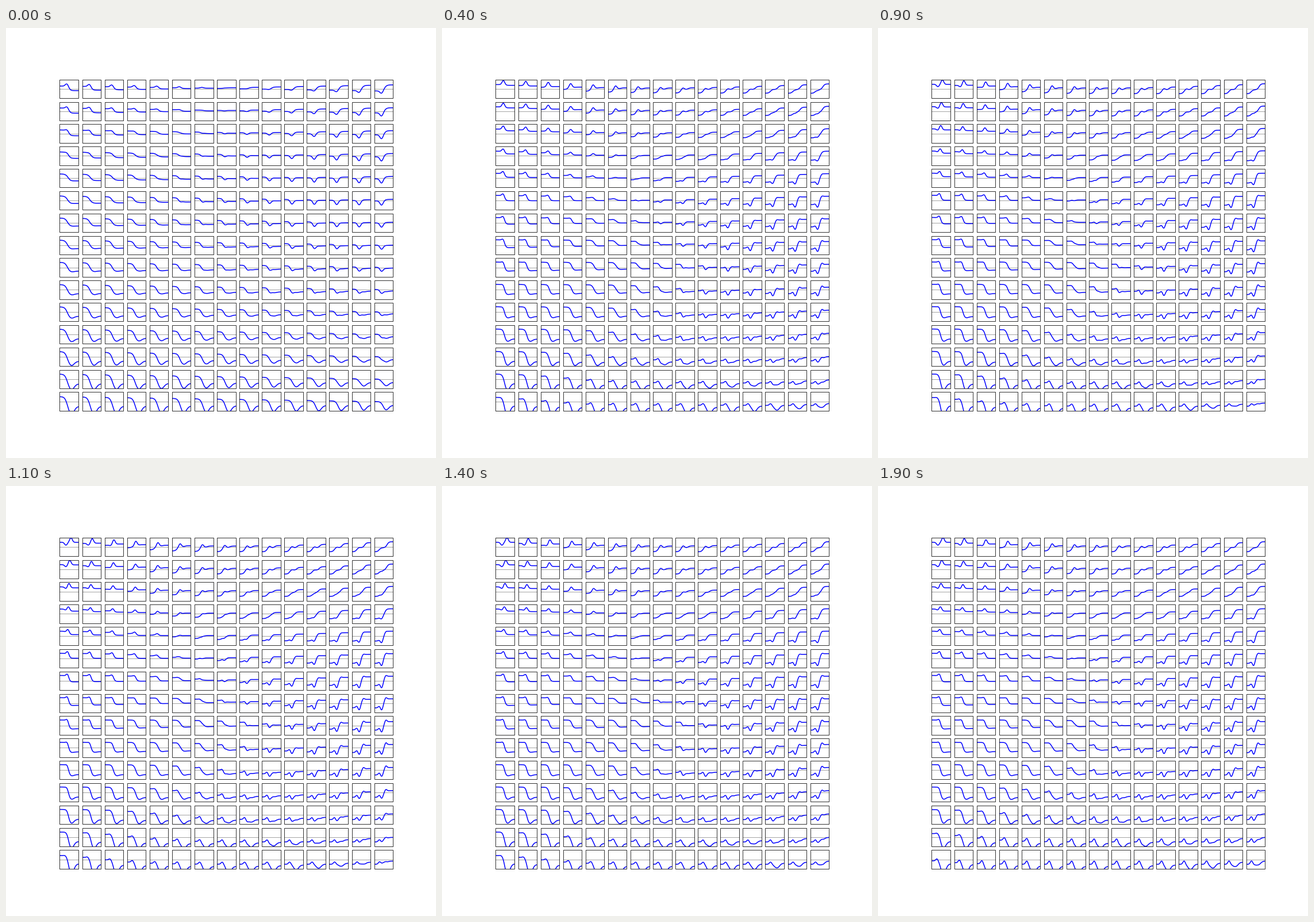
Recreate the animation shown at these times as a matplotlib script. Size 748 px wide and 748 px high, loop 2000 ms.

```python
import numpy as np
import matplotlib.pyplot as plt
from matplotlib.animation import FuncAnimation
from matplotlib.patches import Rectangle
from matplotlib.transforms import Bbox

SIZE, DPI, N, FRAMES = 748, 72, 15, 20

# row, column and position along the curve, shaped to broadcast
r = np.arange(N)[:, None, None]
c = np.arange(N)[None, :, None]
u = np.linspace(0, 1, 49)[None, None, :]
q, p = r / (N - 1), c / (N - 1)
corner = np.exp(-(r + c) / 2.5)


def ease(x):
    x = np.clip(x, 0, 1)
    return x * x * (3 - 2 * x)


def step(at, width):
    return 1 / (1 + np.exp((at - u) / width))


def bump(at, width):
    return np.exp(-((u - at) / width) ** 2)


def untrained():
    """Smooth map: curves fall on the left and dip on the right."""
    first = 5 + 4 * np.sin(2.2 * q) - 8.5 * p
    last = 10 * p - 3 - q * (6 + 8 * p)
    kink = np.clip(6 * np.maximum(1 - 3 * q, 0) - 11 * p, -8, 7)
    trough = -14 * q**4 * (1 - 0.4 * p)
    return (first + (last - first) * step(0.44 + 0.1 * p - 0.06 * q, 0.07)
            + kink * (1 - q**3) * bump(0.39 + 0.1 * q * (1 - p), 0.12)
            + trough * bump(0.62, 0.2))


def trained(t):
    """Sharp map: high starts left of a curved border, low ones right of it."""
    grow = ease((t - 3) / 8)
    fade = ease((t - 14) / 5)
    border = np.minimum(2.5 + 0.12 * r**2, 9.5 - 1.3 * (r - 8))
    border = border - 2.4 * fade * q**6
    side = np.tanh((c - border) / (2 + np.exp(-((r - 5) / 3) ** 2)))
    low = (1 + side) / 2
    first = 0.5 - 9 * side

    left = 8 - 16 * ease(q / 0.75)
    right = 9 - 12 * q**3
    last = (left + (right - left) * p
            - 7 * np.sin(np.pi * p) * np.abs(np.cos(np.pi * q)))

    # near the top the climb splits into two steps
    split = 1 - ease(q / 0.4)
    late = 0.6 * p
    climb = ((1 - late) * step(0.46 - 0.2 * split, 0.05)
             + late * step(0.5 + 0.18 * split, 0.05))
    y = first + (last - first) * climb

    kink = np.clip(9 - 9 * p - 8 * q - 14 * p * q, -7, 8)
    y = y + kink * (1 - q**4) * bump(0.4 + 0.2 * grow * corner, 0.1)
    y = y - 5 * grow * corner * bump(0.33, 0.1)
    y = y - 18 * q**6 * (1 - 0.6 * p) * bump(0.62, 0.18)

    # ripples of the lower right half
    y = y + (4 + 2 * fade * q) * low * ease(r / 9) * bump(0.28, 0.09)
    y = y + 4 * low * p**3 * np.exp(-((r - 9) / 4) ** 2) * bump(0.62, 0.08)
    hump = np.exp(-((t - 10) / 2.5) ** 2) * p**4 * q**6
    return y + 7 * hump * bump(0.6, 0.2)


def curves(t):
    mix = 1 - np.exp(-t / 2.2)
    y = untrained() * (1 - mix) + trained(t) * mix
    return y.reshape(N * N, -1)


fig = plt.figure(figsize=(SIZE / DPI, SIZE / DPI), dpi=DPI, facecolor="white")
ax = fig.add_axes([0, 0, 1, 1])
ax.set(xlim=(0, SIZE), ylim=(0, SIZE))
ax.axis("off")

# default subplot margins with a gap of 0.2 cell
span = N + 0.2 * (N - 1)
W, H = 0.775 * SIZE / span, 0.77 * SIZE / span
lines, middles = [], []
for row in range(N):
    for col in range(N):
        x0 = 0.125 * SIZE + 1.2 * W * col
        y0 = 0.88 * SIZE - H - 1.2 * H * row
        mid = y0 + H / 2
        ax.plot([x0, x0 + W], [mid, mid], color="gray", lw=0.7, zorder=1)
        line, = ax.plot(x0 + u.ravel() * W, 0 * u.ravel() + mid,
                        color="blue", lw=1.5)
        line.set_clip_box(Bbox.from_bounds(x0, y0, W, H))
        ax.add_patch(Rectangle((x0, y0), W, H, fill=False, ec="black",
                               lw=0.8, zorder=3))
        lines.append(line)
        middles.append(mid)


def update(frame):
    for line, mid, y in zip(lines, middles, curves(frame)):
        line.set_ydata(mid + y)
    return lines


anim = FuncAnimation(fig, update, frames=FRAMES, interval=100,
                     init_func=lambda: update(0), repeat=True)
plt.show()
```
